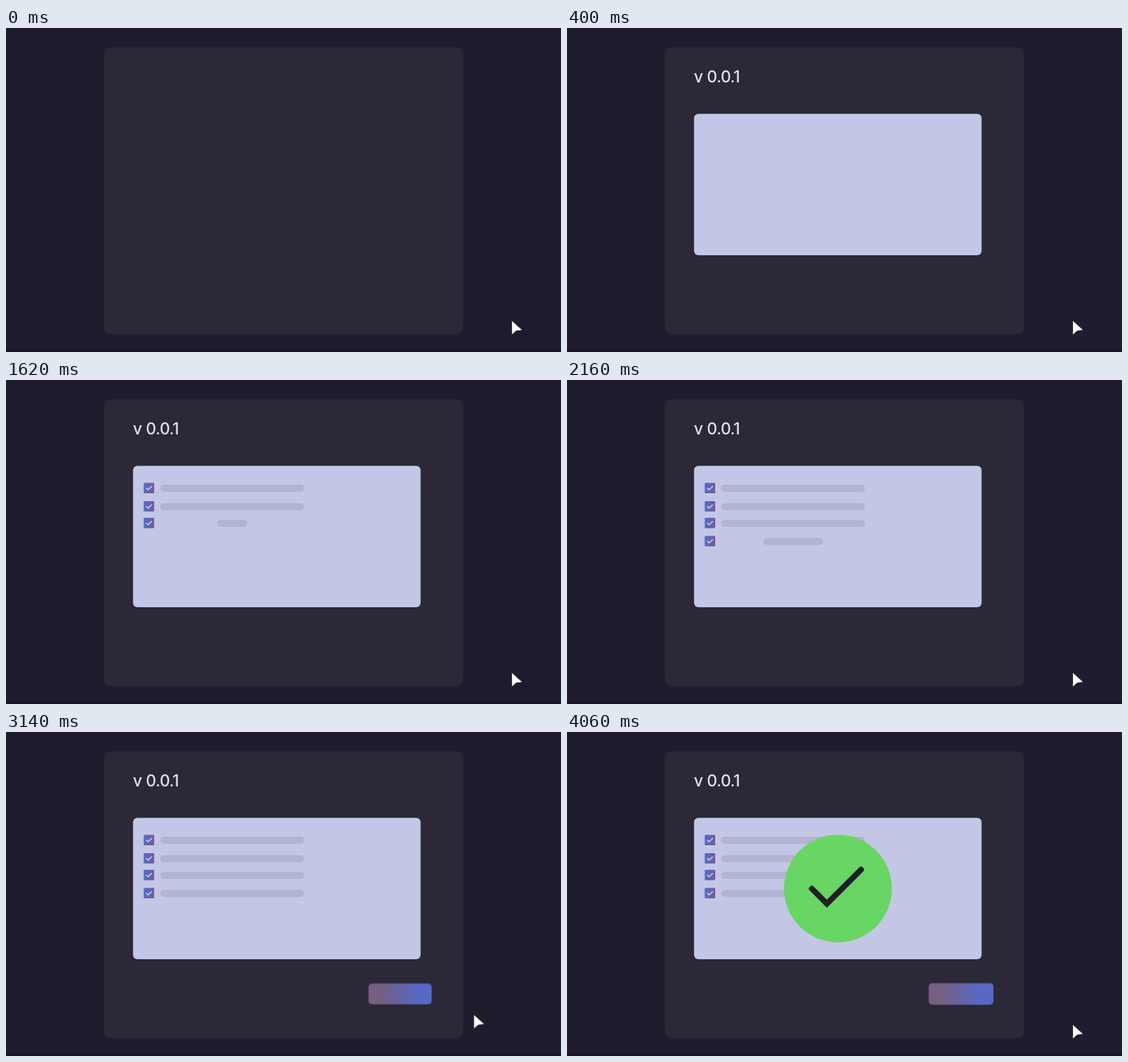
An HTML page that plays this animation: 772 by 452 pixels, repeating every 5000 ms.

```html
<!DOCTYPE html>
<html lang="en">
<head>
<meta charset="utf-8">
<title>Release checklist</title>
<style>
  html, body { margin: 0; width: 100%; height: 100%; overflow: hidden; background: #1f1c2e; }
  svg { display: block; width: 772px; height: 452px; }

  /* One shared 5 s timeline: 1% = 50 ms */
  .a { animation: 5s linear infinite; transform-box: fill-box; transform-origin: center; }

  .title { font: 500 22.5px Inter, sans-serif; letter-spacing: -.5px; fill: #e0def4; animation-name: title; }
  .panel { fill: #c4c6e6; animation-name: panel; }
  .bar { fill: #b3b4cf; height: 10px; rx: 5px; }
  .tick { fill: none; stroke: #c8cbea; stroke-width: 1.6; }
  .button { animation-name: button; }
  .cursor { fill: #fff; animation-name: cursor; }
  .disc { fill: #67d663; animation-name: disc; }
  .check { fill: none; stroke: url(#ink); stroke-width: 8; stroke-linecap: round;
           stroke-dasharray: 97 130; animation-name: check; }

  .box1 { animation-name: box1; } .bar1 { animation-name: bar1; }
  .box2 { animation-name: box2; } .bar2 { animation-name: bar2; }
  .box3 { animation-name: box3; } .bar3 { animation-name: bar3; }
  .box4 { animation-name: box4; } .bar4 { animation-name: bar4; }

  @keyframes title { 0%, .38% { opacity: 0 } .381%, 100% { opacity: 1 } }
  @keyframes panel { 0% { transform: scale(0) } 8%, 100% { transform: none } }

  @keyframes box1 { 0%, 9.1% { transform: scale(0) } 11.44%, 100% { transform: scale(1) } }
  @keyframes box2 { 0%, 18.86% { transform: scale(0) } 21.2%, 100% { transform: scale(1) } }
  @keyframes box3 { 0%, 28.62% { transform: scale(0) } 30.96%, 100% { transform: scale(1) } }
  @keyframes box4 { 0%, 38.38% { transform: scale(0) } 40.72%, 100% { transform: scale(1) } }

  /* Bars widen from their middle and keep round ends */
  @keyframes bar1 { 0%, 11.86% { x: 314.6px; width: 0px } 16.86%, 100% { x: 214.6px; width: 200px } }
  @keyframes bar2 { 0%, 21.62% { x: 314.6px; width: 0px } 26.62%, 100% { x: 214.6px; width: 200px } }
  @keyframes bar3 { 0%, 31.38% { x: 314.6px; width: 0px } 36.38%, 100% { x: 214.6px; width: 200px } }
  @keyframes bar4 { 0%, 41.14% { x: 314.6px; width: 0px } 46.14%, 100% { x: 214.6px; width: 200px } }

  @keyframes button {
    0%, 46.7% { transform: scale(0) }
    51.7%, 58% { transform: scale(1) }
    60% { transform: scale(.9) }
    63.8%, 100% { transform: scale(1) }
  }
  @keyframes cursor {
    0%, 51.76% { transform: translate(0, 0) }
    59.4% { transform: translate(-95.5px, -25.2px) }
    67.04%, 100% { transform: translate(0, 0) }
  }
  @keyframes disc { 0%, 67.2% { transform: scale(0) } 75.2%, 100% { transform: scale(1) } }
  @keyframes check {
    0%, 75.2% { stroke-dashoffset: 97; opacity: 0 }
    75.21% { stroke-dashoffset: 97; opacity: 1 }
    81.2%, 100% { stroke-dashoffset: 0; opacity: 1 }
  }
</style>
</head>
<body>
<svg viewBox="0 0 772 452">
  <defs>
    <linearGradient id="fade">
      <stop offset=".2" stop-color="#755f82"/>
      <stop offset=".82" stop-color="#5868c8"/>
    </linearGradient>
    <linearGradient id="tint" x2="1" y2=".35">
      <stop offset=".45" stop-color="#5767c8"/>
      <stop offset="1" stop-color="#705f8c"/>
    </linearGradient>
    <linearGradient id="ink">
      <stop offset=".3" stop-color="#231f22"/>
      <stop offset=".7" stop-color="#1f1c2e"/>
    </linearGradient>
    <g id="box">
      <rect width="14.5" height="14.5" rx="1" fill="url(#tint)"/>
      <path class="tick" d="M3.4 7.2 6.1 9.8 11.3 4.7"/>
    </g>
  </defs>

  <rect width="772" height="452" fill="#1f1c2e"/>
  <rect y="448" width="772" height="4" fill="#1b1225"/>
  <rect x="136" y="27" width="500" height="400" rx="10" fill="#2b2837"/>

  <text class="a title" x="176.6" y="76">v 0.0.1</text>
  <rect class="a panel" x="176.7" y="119.8" width="400" height="197.2" rx="6"/>

  <g class="a box1"><use href="#box" x="191.6" y="143.4"/></g>
  <g class="a box2"><use href="#box" x="191.6" y="169"/></g>
  <g class="a box3"><use href="#box" x="191.6" y="192.2"/></g>
  <g class="a box4"><use href="#box" x="191.6" y="217.5"/></g>

  <rect class="a bar bar1" y="146"/>
  <rect class="a bar bar2" y="171.8"/>
  <rect class="a bar bar3" y="195"/>
  <rect class="a bar bar4" y="220.3"/>

  <rect class="a button" x="503.2" y="350.4" width="90" height="30" rx="5" fill="url(#fade)"/>
  <circle class="a disc" cx="376.9" cy="218.4" r="75"/>
  <path class="a check" d="M340.5 218.5 361.5 239.5 409 192"/>
  <path class="a cursor" d="M703.8 408.8 717.6 421.2 709.6 422.3 703.8 427.4Z"/>
</svg>
</body>
</html>
```
